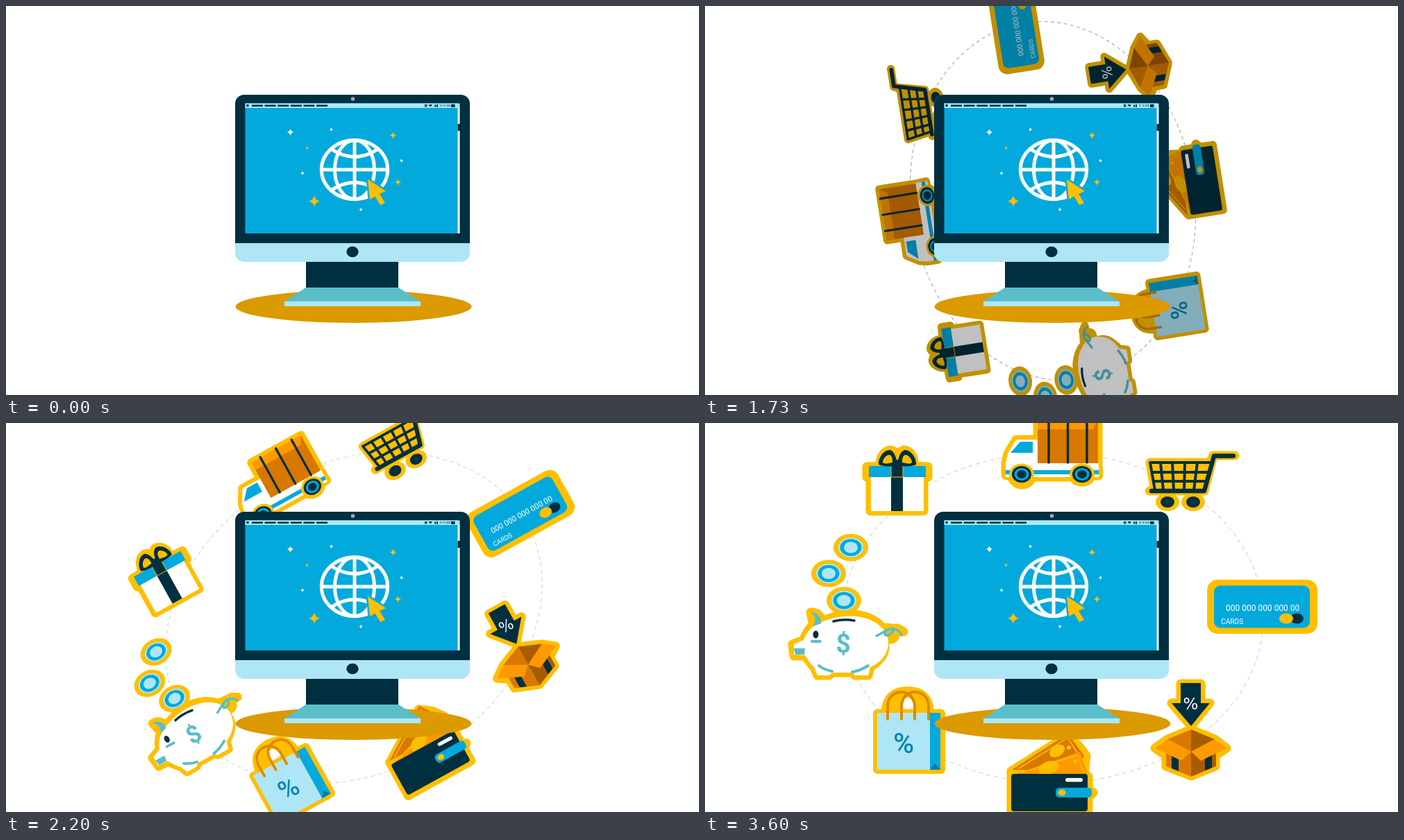
Write an HTML page that moves like this. It is 998x561 px and loops after 3.99 s.

```html
<!DOCTYPE html>
<html lang="en">
<head>
<meta charset="utf-8">
<title>Online shopping</title>
<style>
html, body { margin: 0; width: 100%; height: 100%; overflow: hidden; background: #fff; }
svg { display: block; width: 100vw; height: 100vh; }
.halo { fill: #ffbf00; stroke: #ffbf00; stroke-width: 13; stroke-linejoin: round; stroke-linecap: round; }
.navy { fill: #002f40; }
.blue { fill: #03a9dc; }
.pale { fill: #aee6f6; }
.teal { fill: #59bec9; }
.gold { fill: #ffbf00; }
.orange { fill: #ff9900; }
.rust { fill: #d97800; }
.brown { fill: #a85c00; }
.white { fill: #fff; }
.line { fill: none; stroke-linecap: round; stroke-linejoin: round; }
.ink { stroke: #002f40; }
.mint { stroke: #59bec9; }
text { font-family: Roboto, sans-serif; }
</style>
</head>
<body>
<svg viewBox="0 0 998 561" preserveAspectRatio="none">
<g id="ring">
  <ellipse cx="501" cy="281" rx="303" ry="238" fill="none" stroke="#d6d6d6" stroke-width="1.2" stroke-dasharray="6 5"/>

  <g id="truck">
    <path class="halo" d="M479 -4H566V58L567 76H556A13.5 11 0 0 1 530 78H470A13.5 11 0 0 1 443 78L433 75V58L436 44L448 24H479Z"/>
    <path class="white" d="M433 76V58L436 44L448 24H479V57H567V78H433Z"/>
    <path class="blue" d="M440 43L454 27H472V43ZM433 68H567V74H433Z"/>
    <path class="rust" d="M479 -4H566V58H479Z"/>
    <path class="orange" d="M479 -4H566L558 9H479Z"/>
    <path class="line ink" stroke-width="3.5" d="M495 -5V57M522.500 -5V57M550 -5V57"/>
    <g id="wheels"></g>
  </g>

  <g id="cart">
    <path class="halo" d="M641 57H727L732 47H763H732L719 98H640H648Z"/>
    <ellipse class="gold" cx="666" cy="114" rx="17" ry="13"/>
    <ellipse class="gold" cx="703" cy="114" rx="17" ry="13"/>
    <path class="line ink" stroke-width="4" d="M641 57H728M644 71H725M646 84H721M641 57L648 97M656 57L660 97M673 57L675 97M691 57L690 97M709 57L704 97"/>
    <path class="line ink" stroke-width="6.500" d="M761 47.500H733L719 98H643"/>
    <ellipse class="navy" cx="666" cy="114" rx="10" ry="8"/>
    <ellipse class="navy" cx="703" cy="114" rx="10" ry="8"/>
  </g>

  <g id="card">
    <rect class="gold" x="723" y="226" width="159" height="78" rx="15"/>
    <rect class="blue" x="733" y="234.500" width="138" height="61" rx="9"/>
    <text class="white" x="750" y="271" font-size="12">000 000 000 000 00</text>
    <text class="white" x="743" y="290" font-size="10.200">CARDS</text>
    <ellipse class="navy" cx="852.500" cy="282" rx="9.500" ry="7.500"/>
    <ellipse class="gold" cx="837" cy="282" rx="10" ry="7.500"/>
  </g>

  <g id="parcel">
    <path class="halo" d="M685 376H714V404H727L700 437L672 404H685Z"/>
    <path class="halo" d="M700 442L734 456L751 469L735 480V495L700 509L664 495V480L648 469L666 456Z"/>
    <path class="navy" d="M685 375H714V404H727L700 437L672 404H685Z"/>
    <text class="white" x="699.500" y="413" font-size="23" text-anchor="middle" style="font-family:'DejaVu Sans',sans-serif">%</text>
    <path class="rust" d="M664 474L700 472V510L664 495Z"/>
    <path class="brown" d="M736 474L700 472V510L736 495Z"/>
    <path class="navy" d="M672 480H682V502L672 498ZM720 480H730V497L720 501Z"/>
    <path class="rust" d="M700 442L666 456L700 474Z"/>
    <path class="brown" d="M700 442L734 456L700 474Z"/>
    <path class="orange" d="M666 456L700 474L686 487L648 469ZM734 456L700 474L714 487L752 469Z"/>
  </g>

  <g id="wallet">
    <path class="halo" d="M441 502L520 452L537 464L549 480L546 506L552 510V528L559 533L552 540V561H441Z"/>
    <path class="rust" d="M442 500L523 448L546 480L530 502Z"/>
    <path class="line" stroke="#ffbf00" stroke-width="1.500" d="M452 498L522 454L538 478"/>
    <ellipse class="gold" cx="507" cy="473" rx="12" ry="8" transform="rotate(-32 507 473)"/>
    <circle class="gold" cx="524" cy="468" r="3"/>
    <path class="orange" d="M448 506L540 474L551 506Z"/>
    <path class="line" stroke="#ffbf00" stroke-width="1.500" d="M457 504L536 479L545 504"/>
    <ellipse class="gold" cx="495" cy="497" rx="15" ry="9" transform="rotate(-18 495 497)"/>
    <circle class="gold" cx="533" cy="488" r="3"/>
    <rect class="navy" x="441" y="506" width="110" height="54" rx="4"/>
    <rect class="white" x="519" y="512" width="25" height="5.500" rx="2.700"/>
    <rect class="blue" x="505" y="526" width="52" height="14" rx="5"/>
    <ellipse class="gold" cx="514" cy="533" rx="5.500" ry="4.500"/>
  </g>

  <g id="bag">
    <path class="gold" fill-rule="evenodd" d="M254 418C254 392 270 380 292 380C316 380 330 394 330 418ZM282 414H301C301 390 282 390 282 414Z"/>
    <path class="halo" d="M248.500 419H339.500V499.500H248.500Z"/>
    <path class="pale" d="M248 418H324V500H248Z"/>
    <path class="blue" d="M324 418H339V500H324Z"/>
    <path fill="#077aaa" d="M324 500L331 491L339 500Z"/>
    <path class="line" stroke="#df8a00" stroke-width="4" d="M263 427V409C263 381 302 381 302 409V427M283 427V409C283 381 322 381 322 409V427"/>
    <text x="286" y="476" font-size="41" font-weight="500" fill="#0c86b4" text-anchor="middle">%</text>
  </g>

  <g id="pig">
    <path class="halo" d="M152 273C161 272 167 278 168 286C220 262 258 285 264 312C270 313 276 309 273 302L286 301L277 296C265 298 259 290 248 301C270 325 255 341 238 352L235 364H216L213 360H183L179 364H162L157 352C151 347 148 340 144 336H128L126 319L142 313C145 303 150 296 156 291Z"/>
    <path class="white" d="M168 287C215 267 262 284 264 316C264 336 250 347 238 352L235 364H216L213 360H183L179 364H162L157 352C151 347 148 340 144 335L128 334V319L142 313C147 300 154 293 168 287Z"/>
    <path class="teal" d="M152 273C161 272 168 280 167 289C163 291 158 292 155 293C161 285 159 278 152 273ZM128 325H144L143 334H130Z"/>
    <ellipse class="navy" cx="159.500" cy="305" rx="4" ry="5.500"/>
    <path class="line mint" stroke-width="4" d="M154 315H166M164 350Q172 356 183 358M212 359Q224 357 235 350"/>
    <path class="line mint" stroke-width="3.500" d="M247 307C257 302 271 292 271 298C270 306 258 309 259 303C263 295 277 294 283 305"/>
    <path class="line ink" stroke-width="3.500" d="M185 286Q200 282 215 285"/>
    <text class="teal" x="199" y="331" font-size="37" font-weight="700" text-anchor="middle">$</text>
    <g id="coins"></g>
  </g>

  <g id="gift">
    <path class="halo" d="M233 63L254 62C249 50 260 38 268 39Q274 41 277 46Q281 41 286 39C294 38 305 50 299 62L321 63V78L315 80V127H238V80L233 78Z"/>
    <path class="white" d="M239 77H315V127H239Z"/>
    <path class="blue" d="M236 62H318V78H236Z"/>
    <path class="navy" d="M268 62H285V127H268Z"/>
    <path class="line" stroke="#ffbf00" stroke-width="1" d="M268 62V78H285V62"/>
    <path class="navy" d="M277 62C270 62 260 64 250 60C249 50 258 38 267 39C274 42 276 52 277 62C278 52 280 42 287 39C296 38 305 50 304 60C294 64 284 62 277 62Z"/>
    <path class="gold" d="M270 57C264 58 259 60 256 57C256 51 262 45 266 46C270 48 270 53 270 57ZM284 57C290 58 295 60 298 57C298 51 292 45 288 46C284 48 284 53 284 57Z"/>
    <ellipse class="navy" cx="277" cy="58" rx="6" ry="5"/>
  </g>
</g>

<g id="desk">
  <ellipse cx="500.500" cy="433.500" rx="170" ry="23.500" fill="#db9a00"/>
  <path class="navy" d="M432 368H565V407H432Z"/>
  <path class="teal" d="M432 406H565L597 426H401Z"/>
  <path class="pale" d="M401 426H597V433H401Z"/>
  <rect class="pale" x="330" y="128" width="338" height="241" rx="13"/>
  <path class="navy" d="M330 342V141A13 13 0 0 1 343 128H655A13 13 0 0 1 668 141V342Z"/>
  <circle cx="499.500" cy="134" r="2.800" fill="#a9a9a9"/>
  <ellipse class="navy" cx="499" cy="354.500" rx="8.700" ry="7.700"/>
  <path class="blue" d="M344.500 140H651V328H344.500Z"/>
  <path class="white" d="M650.500 146H653.500V328H650.500Z"/>
  <path class="pale" d="M344.500 140.500H653.500V147H344.500Z"/>
  <rect class="navy" x="650.500" y="170" width="4" height="10"/>
  <circle class="navy" cx="348" cy="143.500" r="1.800"/>
  <path class="ink" stroke-width="2.400" stroke-dasharray="16 2.600" d="M354 143.700H463"/>
  <circle class="line ink" cx="604.700" cy="143.700" r="1.400" stroke-width="1.200"/>
  <path class="navy" d="M608.500 142.500Q611 141.500 614 142.500L611.200 145.500ZM617 143L619 142V146L617 145ZM620 141.800H621.800V146H620ZM641 141.700H646.500V146H641Z"/>
  <text class="navy" x="624" y="145.400" font-size="3.700">10:10 AM</text>
  <g id="web">
    <g class="line" stroke="#fff" stroke-width="5">
      <ellipse cx="502" cy="236" rx="47.700" ry="42.500"/>
      <ellipse cx="502" cy="236" rx="28.500" ry="42.500"/>
      <path stroke-linecap="butt" d="M502 193V279M454 236H550M468 206Q502 229 536 206M468 266Q502 243 536 266"/>
    </g>
    <path class="gold" stroke="#03a9dc" stroke-width="5" paint-order="stroke" d="M521 250L547 267L538 271L546 284L539 287L531.500 274.500L524 279Z"/>
    <g id="stars"></g>
  </g>
</g>
</svg>
<script>
const LOOP = 3990, STEP = 200 / 3;
const $ = id => document.getElementById(id);
const oval = (cls, x, y, rx, ry) => `<ellipse class="${cls}" cx="${x}" cy="${y}" rx="${rx}" ry="${ry}"/>`;

const star = ([x, y, r, cls]) => {
  const c = r * 0.16;
  return `<path class="${cls}" transform="translate(${x} ${y})" d="M0 ${-r}Q${c} ${-c} ${r} 0Q${c} ${c} 0 ${r}Q${-c} ${c} ${-r} 0Q${-c} ${-c} 0 ${-r}Z"/>`;
};

$("stars").innerHTML = [
  [409.5, 182, 5, "white"], [468.5, 178, 2.8, "white"], [557.5, 186.5, 5, "gold"],
  [433.5, 205, 2.6, "gold"], [569.5, 223, 2.8, "white"], [427, 241, 2.8, "white"],
  [564.5, 254, 4.8, "gold"], [444, 281.5, 8.3, "gold"], [511, 293.5, 2.8, "white"]
].map(star).join("");

$("coins").innerHTML = [[210, 179.5], [178, 217], [200, 256]].map(([x, y]) =>
  oval("gold", x, y, 25, 19.7) + oval("pale", x, y, 18, 14.2) +
  oval("blue", x, y, 15.5, 12.3) + oval("pale", x, y, 10, 8)).join("");

$("wheels").innerHTML = [456, 543].map(x =>
  oval("gold", x, 74, 18, 15.5) + oval("navy", x, 74, 14, 12) +
  oval("blue", x, 74, 10.5, 9) + oval("navy", x, 74, 7, 6)).join("");

// time, angle, scale
const SPIN = [
  [1200, -180, 0.7], [1533, -129, 0.805], [1867, -79, 0.893], [2200, -29, 0.938], [2500, 0, 1]
];

function spinAt(t) {
  const i = SPIN.findIndex(k => k[0] >= t);
  if (i < 1) return SPIN[SPIN.length - 1];
  const a = SPIN[i - 1], b = SPIN[i], u = (t - a[0]) / (b[0] - a[0]);
  return a.map((v, j) => v + (b[j] - v) * u);
}

const clamp = v => Math.min(1, Math.max(0, v));
const glow = (t, start, length) => Math.pow(clamp((t - start) / length), 1 / 2.2);
const pulse = (t, start) => 0.23 * Math.sin(Math.PI * clamp((t - start) / 300));

function shade(el, p) {
  el.style.filter = p < 1 ? `brightness(${p})` : "none";
}

function draw(now) {
  const t = Math.floor((now % LOOP + 5) / STEP) * STEP;

  shade($("desk"), t < 600 ? 1 : glow(t, 533, 667));

  const ring = $("ring");
  ring.style.display = t > 1201 ? "" : "none";
  shade(ring, glow(t, 1200, 1000));
  const [, angle, size] = spinAt(t);
  ring.setAttribute("transform", `translate(501 281) rotate(${angle}) scale(${size}) translate(-501 -281)`);

  const zoom = 1 - pulse(t, 2500) - pulse(t, 3300);
  $("web").setAttribute("transform", `translate(502 236) scale(${zoom}) translate(-502 -236)`);
}

function tick() {
  draw(performance.now());
  requestAnimationFrame(tick);
}
tick();
</script>
</body>
</html>
```
